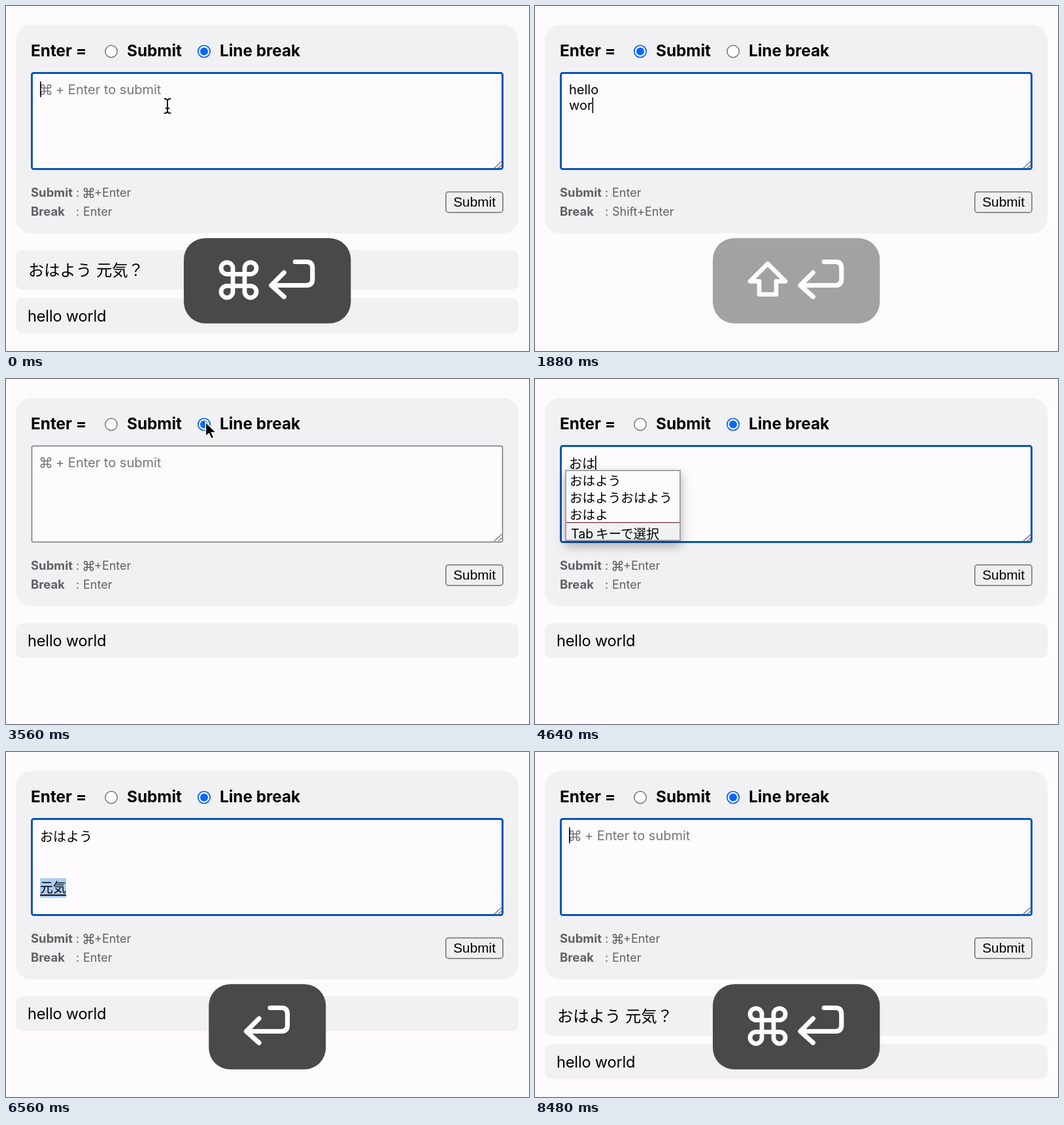
An HTML page that plays this animation: 800 px wide and 528 px high, repeating every 8520 ms.

```html
<!DOCTYPE html>
<html lang="ja">
<head>
<meta charset="utf-8">
<style>
html, body { margin: 0; width: 100%; height: 100%; overflow: hidden; background: #fdfbfd; }
svg { display: block; width: 800px; height: 528px; font: 20px Inter, "Noto Sans CJK JP", "Noto Sans CJK", sans-serif; }
text { white-space: pre; }
.head { font-size: 24.3px; font-weight: 700; }
.hint { font-size: 18px; fill: #606064; }
.hint tspan { font-size: 18.5px; font-weight: 700; }
.msg { font-size: 23.6px; letter-spacing: -.18px; }
.ja { font-size: 24.3px; letter-spacing: 0; }
.row { font-size: 19.6px; }
.line { fill: none; stroke-linecap: round; stroke-linejoin: round; }
.pop { filter: drop-shadow(0 7px 8px rgba(0, 0, 0, .3)); }
</style>
</head>
<body>
<svg id="stage" viewBox="0 0 800 528"></svg>
<script>
const LOOP = 8520, STEP = 40, FIRST = 80;
const SENT1 = 2600, SENT2 = 8280, SWITCH = 3440, REFOCUS = 3960, HIDE_MOUSE = 4240;
const PLAIN = 0, COMPOSE = 1, CONVERTED = 2, UNDERLINE = 3;

// [time, text in the box, input state]
const edits = [
  [80, ''], [160, 'h'], [240, 'he'], [320, 'hel'], [400, 'hell'], [480, 'hello'],
  [1320, 'hello\n'], [1640, 'hello\nw'], [1760, 'hello\nwo'], [1880, 'hello\nwor'],
  [2000, 'hello\nworl'], [2100, 'hello\nworld'], [SENT1, ''], [REFOCUS, ''],
  [4240, 'お', COMPOSE], [4440, 'おh', COMPOSE], [4560, 'おは', COMPOSE],
  [4720, 'おはy', COMPOSE], [4840, 'おはよ', COMPOSE], [4960, 'おはよう', COMPOSE],
  [5240, 'おはよう'], [5480, 'おはよう\n'], [5640, 'おはよう\n\n'], [5800, 'おはよう\n\n\n'],
  [6000, 'おはよう\n\n\ng', COMPOSE], [6080, 'おはよう\n\n\nげ', COMPOSE],
  [6160, 'おはよう\n\n\nげん', COMPOSE], [6240, 'おはよう\n\n\nげんk', COMPOSE],
  [6320, 'おはよう\n\n\nげんき', COMPOSE], [6440, 'おはよう\n\n\n元気', CONVERTED],
  [6680, 'おはよう\n\n\n元気'], [7120, 'おはよう\n\n\n元気？', UNDERLINE],
  [7440, 'おはよう\n\n\n元気？'], [SENT2, '']
];

// [time, modifier]
const presses = [
  [1280, 'shift'], [2520], [5200], [5460], [5620], [5818], [6440], [7360], [8160, 'cmd']
];

// [time, x, y]
const mousePath = [
  [2880, 247, 153], [3240, 308, 62], [3520, 308, 62], [3840, 247, 153]
];

const CMD = 'M-9-18a9 9 0 1 0-9 9H18a9 9 0 1 0-9-9V18a9 9 0 1 0 9-9H-18a9 9 0 1 0 9 9Z';
const SHIFT = 'M0-25L27 2H13V22H-13V2H-27Z';
const RETURN = 'M404 391.5H421q9.5 0 9.5 9.5V418q0 9.5-9.5 9.5H368M387 408L367.5 427.5L387 445';

const stage = document.getElementById('stage');
const pen = document.createElement('canvas').getContext('2d');
pen.font = '20px Inter, "Noto Sans CJK JP", "Noto Sans CJK", sans-serif';

const last = (list, t) => list.filter(e => e[0] <= t).pop();
const isJa = s => /[^\x00-\x7f]/.test(s);
const rect = (x, y, w, h, r, attrs) =>
  `<rect x="${x}" y="${y}" width="${w}" height="${h}" rx="${r}" ${attrs}/>`;
const text = (x, y, s, cls = '', attrs = '') =>
  `<text x="${x}" y="${y}" class="${cls}" ${attrs}>${s}</text>`;
const line = (d, color, width, attrs = '') =>
  `<path class="line" d="${d}" stroke="${color}" stroke-width="${width}" ${attrs}/>`;
const command = (x, y, k, color, width) =>
  line(CMD, color, width, `transform="translate(${x} ${y}) scale(${k})"`);

function radio(x, on) {
  const color = on ? '#0b67f4' : '#76767a';
  return `<circle cx="${x}" cy="69.5" r="9.2" fill="#fff" stroke="${color}" stroke-width="${on ? 1.8 : 1.5}"/>`
    + (on ? `<circle cx="${x}" cy="69.5" r="6" fill="${color}"/>` : '');
}

function form(breakMode, focused) {
  const hint = (y, name, keys) =>
    text(38, y, `<tspan>${name}</tspan>`, 'hint') + text(107, y, ':', 'hint') + keys;
  const submitKeys = breakMode
    ? command(126.5, 286, .26, '#606064', 6) + text(135, 292, '+Enter', 'hint')
    : text(118, 292, 'Enter', 'hint');
  return rect(15, 29, 769, 319, 24, 'fill="#f1f1f3"')
    + text(38, 77, 'Enter =', 'head') + radio(161, !breakMode) + text(185, 77, 'Submit', 'head')
    + radio(303, breakMode) + text(327, 77, 'Line break', 'head')
    + (focused
      ? rect(39.5, 102.5, 720, 147, 3, 'fill="#fdfbfd" stroke="#0a55b5" stroke-width="3"')
      : rect(39.5, 102.5, 720, 147, 2, 'fill="#fdfbfd" stroke="#76767a" stroke-width="1.5"'))
    + line('M747 248L758 238M753 248L758 243.5', '#77777a', 1.4)
    + hint(292, 'Submit', submitKeys)
    + hint(321, 'Break', text(118, 321, breakMode ? 'Enter' : 'Shift+Enter', 'hint'))
    + rect(672.8, 284.5, 87.2, 31.5, 4, 'fill="#efefef" stroke="#6f6f72" stroke-width="1.5"')
    + text(684.2, 307, 'Submit', '', 'style="font:20.8px Liberation Sans,Arial,sans-serif"');
}

function messages(t) {
  if (t < SENT1) return '';
  const bar = (y, h) => rect(15, y, 769, h, 10, 'fill="#f1f1f3"');
  if (t < SENT2) return bar(373.5, 53.5) + text(33, 409, 'hello world', 'msg');
  return bar(373.5, 60.5) + text(34, 412.5, 'おはよう 元気？', 'msg ja')
    + bar(447, 53.5) + text(33, 482.5, 'hello world', 'msg');
}

function candidates(word, y) {
  const rows = word[0] === 'お' ? ['おはよう', 'おはようおはよう', 'おはよ'] : ['元気', '元気です', 'げんき'];
  return `<g class="pop" transform="translate(0 ${y})">`
    + rect(47, 1, 175, 107, 0, 'fill="#fdfbfd" stroke="#a3a3a5" stroke-width="2"')
    + rect(48, 81, 173, 26, 0, 'fill="#f1f0f2"')
    + rect(48, 80, 173, 1.3, 0, 'fill="#6b3a48"')
    + rows.map((s, i) => text(53, 23.5 + 26 * i, s, 'row')).join('')
    + text(55, 104.5, 'Tab', 'row') + text(93, 104.5, 'キーで選択', 'row') + '</g>';
}

function editor(t, breakMode, focused) {
  const [since, value, state = PLAIN] = last(edits, t);
  const lines = value.split('\n');
  let out = '', top = 114.5, word = '', ja = false;
  if (!value) {
    out += breakMode
      ? command(61, 128, .28, '#757579', 5.5) + text(76, 135, '+ Enter to submit', '', 'fill="#757579"')
      : text(52, 135, 'Shift + Enter for a new line', '', 'fill="#757579"');
  }
  lines.forEach((s, i) => {
    word = s;
    ja = isJa(s);
    const end = i === lines.length - 1, width = pen.measureText(s).width;
    if (end && state === CONVERTED) out += rect(52, top, width, 30, 0, 'fill="#abcdf3"');
    out += text(52, top + (ja ? 22 : 20.5), s);
    if (end && state) {
      const from = state === UNDERLINE ? 40 : 0;
      out += rect(52 + from, top + 25, width - from, state === CONVERTED ? 2 : 1.3, 0, 'fill="#111"');
    }
    if (!end) top += ja ? 30 : 24.3;
  });
  // A submit with Enter leaves the caret's blink phase alone.
  const blinkFrom = since === SENT1 ? 2100 : since;
  const lit = Math.floor((t - blinkFrom) / 500) % 2 === 0;
  if (focused && lit && state !== CONVERTED) {
    out += rect(52 + pen.measureText(word).width, top + (ja ? 3 : 1), 1.6, ja ? 22 : 24, 0, 'fill="#000"');
  }
  return { out, popup: state === COMPOSE ? candidates(word, top + 24.5) : '' };
}

function keycap(t) {
  const press = last(presses, t);
  if (!press) return '';
  const [at, mod] = press, age = t - at;
  const opacity = Math.min(1, 1 - (age - 480) / 240);
  if (opacity <= 0) return '';
  const k = 1 - .2 * (1 - Math.min(1, age / 100)) ** 2;
  const scale = age < 100 ? k : 1;
  const w = mod ? 255.5 : 179;
  let icons = line(RETURN, '#fff', 7.2, mod ? 'transform="translate(38.3 0)"' : '');
  if (mod) icons += line(mod === 'cmd' ? CMD : SHIFT, '#fff', 6.8, 'transform="translate(356 419.3)"');
  return `<g opacity="${opacity}" transform="translate(399.5 420.5) scale(${scale}) translate(-399.5 -420.5)">`
    + rect(399.7 - w / 2, 355.2, w, 130.6, 33, 'fill="#49494b"') + icons + '</g>';
}

function mouse(t) {
  if (t < mousePath[0][0] || (t >= HIDE_MOUSE && t < LOOP)) return '';
  const i = mousePath.findIndex(p => p[0] > t);
  let [, x, y] = mousePath[mousePath.length - 1];
  if (i > 0) {
    const [t0, x0, y0] = mousePath[i - 1], [t1, x1, y1] = mousePath[i];
    const p = (t - t0) / (t1 - t0), e = p * p * (3 - 2 * p);
    x = x0 + (x1 - x0) * e;
    y = y0 + (y1 - y0) * e;
  }
  const at = `transform="translate(${x} ${y})"`;
  if (y < 101) {
    return `<path d="M0 0V22L5 17.5L8.5 25.5L12.5 23.8L9 16H16Z" stroke="#fff" stroke-width="1.5" ${at}/>`;
  }
  const beam = 'M-4.5-11Q0-11 0-7.5Q0-11 4.5-11M0-7.5V7.5M-4.5 11Q0 11 0 7.5Q0 11 4.5 11M-2.5 3.5H2.5';
  return line(beam, '#fff', 4, at) + line(beam, '#111', 2, at);
}

function draw(now) {
  let t = Math.floor((now % LOOP) / STEP) * STEP;
  if (t < FIRST) t += LOOP; // the loop opens on its closing state
  const breakMode = t >= SWITCH, focused = t < SWITCH || t >= REFOCUS;
  const box = editor(t, breakMode, focused);
  stage.innerHTML = form(breakMode, focused) + box.out + messages(t) + box.popup + keycap(t) + mouse(t);
}

const start = performance.now();
function tick() {
  draw(performance.now() - start);
  requestAnimationFrame(tick);
}
tick();
</script>
</body>
</html>
```
